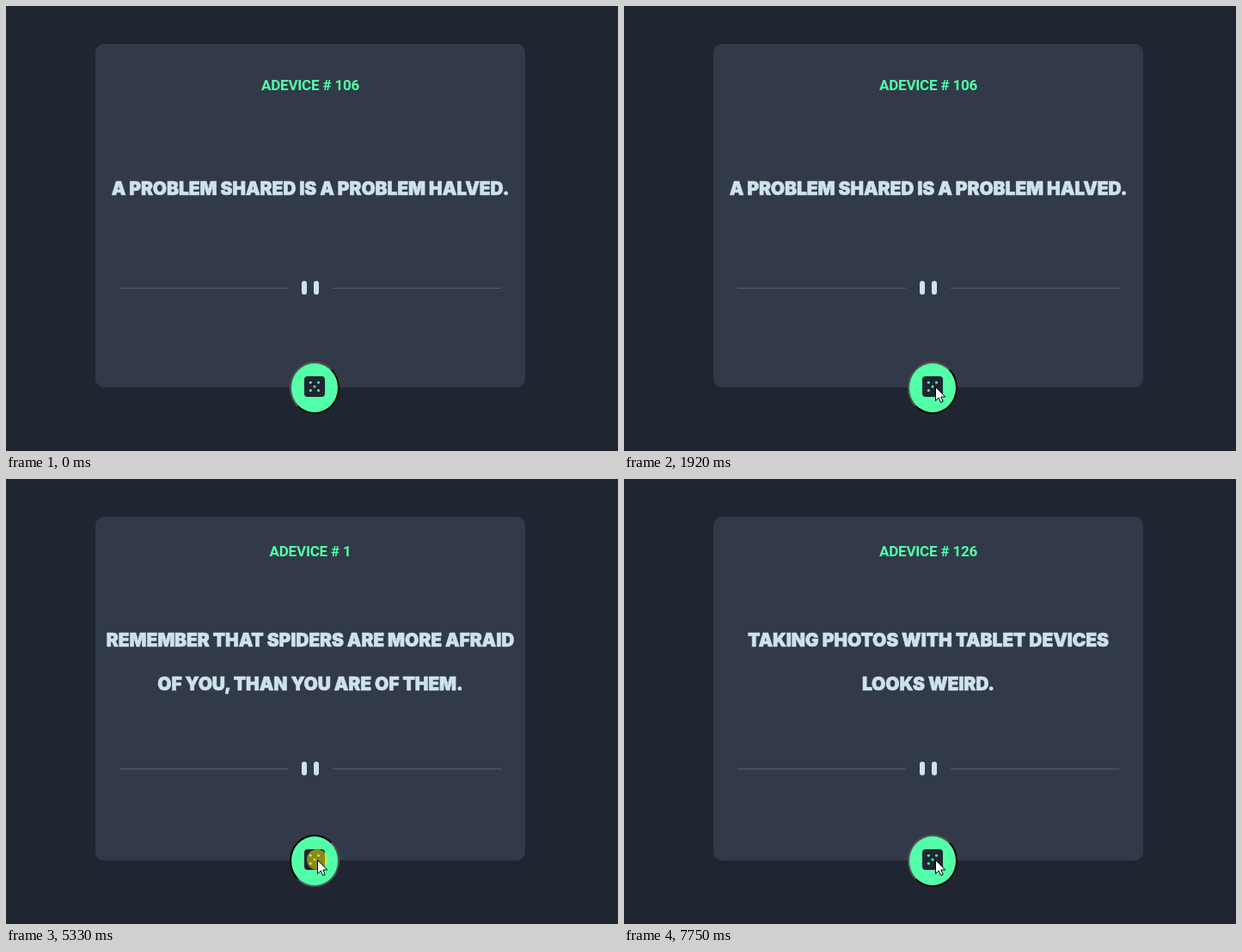
Write an HTML page that moves like this. It is 712x518 px and loops after 8000 ms.

```html
<!DOCTYPE html>
<html lang="en">
<head>
<meta charset="utf-8">
<title>Advice card</title>
<style>
  html, body { margin: 0; width: 100%; height: 100%; overflow: hidden; background: #1f2632; }
  svg { display: block; width: 712px; height: 518px; }
  text { text-anchor: middle; }
  #heading { font: 700 17px Roboto, sans-serif; letter-spacing: -.2px; fill: #52ffa8; }
  #quote {
    font: 900 21px Inter, sans-serif; letter-spacing: -.12px;
    fill: #cee3e9; stroke: #cee3e9; stroke-width: .6px;
  }
  #button {
    box-sizing: border-box; width: 58px; height: 61px;
    border: 2px outset #000; border-radius: 50%; background: #52ffa8;
  }
</style>
</head>
<body>
<svg viewBox="0 0 712 518">
  <rect x="104" y="44" width="500" height="400" rx="10" fill="#323a49"/>
  <text id="heading" x="354"></text>
  <g id="quote">
    <text x="354"></text>
    <text x="354"></text>
  </g>
  <g id="divider">
    <path d="M132 .5H328M380 .5H576" stroke="#4f5d74"/>
    <rect x="344" y="-8" width="6" height="16" rx="3" fill="#cee3e9"/>
    <rect x="358" y="-8" width="6" height="16" rx="3" fill="#cee3e9"/>
  </g>

  <foreignObject x="330" y="414" width="58" height="61"><div id="button"></div></foreignObject>
  <g transform="translate(347 431)" fill="#52ffa8">
    <rect width="24" height="24" rx="4" fill="#1f2632"/>
    <circle cx="7.3" cy="7.3" r="1.5"/>
    <circle cx="16.5" cy="7.3" r="1.5"/>
    <circle cx="12" cy="12" r="1.5"/>
    <circle cx="7.3" cy="16.6" r="1.5"/>
    <circle cx="16.5" cy="16.6" r="1.5"/>
  </g>

  <circle id="clickSpot" cx="362" cy="443" r="12" fill="#ffeb00" fill-opacity=".5"/>
  <path id="cursor" d="M.5.5V16.5L4.2 13 6.6 18.5 9.2 17.4 6.8 12H11.7Z"
        fill="#fff" stroke="#000" stroke-width="1"/>
</svg>
<script>
const LOOP = 8000;
const TICK = 70;

const slips = [
  { from: 0, number: 106, lines: ["A PROBLEM SHARED IS A PROBLEM HALVED."] },
  { from: 3400, number: 1, lines: ["REMEMBER THAT SPIDERS ARE MORE AFRAID", "OF YOU, THAN YOU ARE OF THEM."] },
  { from: 5660, number: 126, lines: ["TAKING PHOTOS WITH TABLET DEVICES", "LOOKS WEIRD."] },
];

const clicks = [
  { from: 2580, to: 2680, pressed: false },
  { from: 5330, to: 5400, pressed: true },
  { from: 7680, to: 7750, pressed: true },
];

// Cursor tip: time, x, y
const path = [
  [450, 488, 506], [800, 434, 411], [940, 410, 375], [1040, 401, 346],
  [1160, 378, 334], [1230, 368, 331], [1370, 355, 325], [1580, 357, 367],
  [1790, 361, 432], [1860, 362, 443],
];

const $ = id => document.getElementById(id);
const quoteLines = [...$("quote").children];
let shown;

function showSlip(slip) {
  if (slip === shown) return;
  shown = slip;
  const single = slip.lines.length === 1;
  $("heading").textContent = `ADEVICE # ${slip.number}`;
  $("heading").setAttribute("y", single ? 98 : 90);
  quoteLines.forEach((line, i) => {
    line.textContent = slip.lines[i] || "";
    line.setAttribute("y", (single ? 220.3 : 194.5) + i * 51);
  });
  $("divider").setAttribute("transform", `translate(0 ${single ? 328 : 337})`);
}

function cursorAt(time) {
  const next = path.findIndex(key => key[0] > time);
  if (next < 0) return path.at(-1).slice(1);
  if (next === 0) return path[0].slice(1);
  const [t0, x0, y0] = path[next - 1];
  const [t1, x1, y1] = path[next];
  const k = (time - t0) / (t1 - t0);
  return [x0 + (x1 - x0) * k, y0 + (y1 - y0) * k].map(Math.round);
}

function draw(t) {
  showSlip(slips.findLast(slip => slip.from <= t));

  const click = clicks.find(c => t >= c.from && t < c.to);
  $("clickSpot").style.display = click ? "" : "none";
  $("button").style.borderStyle = click?.pressed ? "inset" : "outset";

  // The pointer moves in ticks rather than continuously
  const tickTime = Math.floor((t + 30) / TICK) * TICK - 30;
  $("cursor").style.display = t < 450 ? "none" : "";
  $("cursor").setAttribute("transform", `translate(${cursorAt(tickTime)})`);
}

const start = performance.now();
function frame() {
  draw((performance.now() - start) % LOOP);
  requestAnimationFrame(frame);
}
frame();
</script>
</body>
</html>
```
